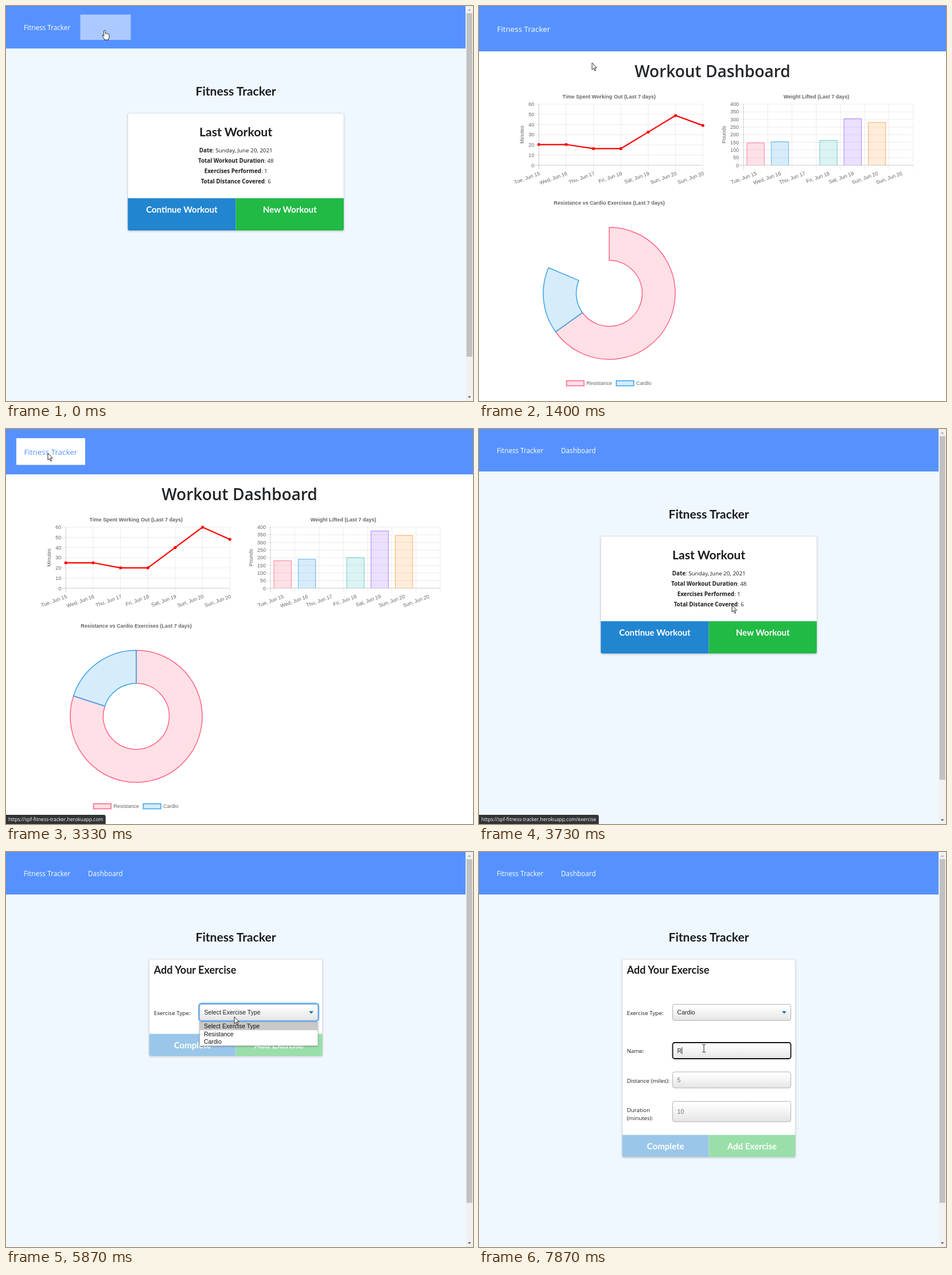
An HTML page for the animation above (8 s loop, 814x688 px).

```html
<!DOCTYPE html>
<html lang="en">
<head>
<meta charset="utf-8">
<title>Fitness Tracker</title>
<style>
html, body { margin: 0; width: 100%; height: 100%; overflow: hidden; }
svg { display: block; width: 100vw; height: 100vh; }
text { white-space: pre; }
.ui { font-family: "Open Sans", "Noto Sans", sans-serif; }
.lato { font-family: Lato, sans-serif; font-weight: 700; }
.arial { font-family: "Liberation Sans", Arial, sans-serif; }
</style>
</head>
<body>
<svg viewBox="0 0 814 688">
  <defs>
    <filter id="soft" x="-10%" y="-10%" width="120%" height="130%">
      <feDropShadow dx="0" dy="1" stdDeviation="1.5" flood-color="#000" flood-opacity=".28"/>
    </filter>
    <linearGradient id="field" x2="0" y2="1">
      <stop offset=".1" stop-color="#fff"/><stop offset="1" stop-color="#e5e5e5"/>
    </linearGradient>
  </defs>
  <g id="stage"></g>
</svg>
<script>
const LOOP = 8000, STEP = 1000 / 15;
const URL_BASE = 'https://spf-fitness-tracker.herokuapp.com';
const stage = document.getElementById('stage');

// Page and interaction times, ms
const AT = { board: 795, charts: 1057, hover: 2930, home: 3395, over: 4065, form: 4690,
  open: 5330, pick: 6530, name: 7130, blink: 7665, typed: 7865 };

const BLUE = [86, 146, 255], WHITE = [255, 255, 255], VISITED = [85, 26, 139];
const GREY = [224, 225, 226], PRIMARY = [33, 133, 208], GREEN = [33, 186, 69], GREEN_HOVER = [22, 171, 57];

// Pointer: time, x, y
const PATH = [
  [0, 172, 42], [1060, 172, 42], [1400, 197, 99], [1870, 378, 300], [2320, 378, 300],
  [2950, 120, 57], [3130, 73, 42], [3395, 73, 42], [3600, 410, 340], [3733, 441, 307],
  [4000, 455, 343], [4065, 455, 344], [4200, 463, 360], [4465, 463, 360], [4733, 465, 362],
  [5270, 400, 282], [5800, 400, 282], [5867, 398, 287], [6270, 372, 330], [6525, 372, 330],
  [7070, 392, 342], [LOOP, 392, 342]
];
const SHAPES = [[0, 'hand'], [860, 'arrow'], [2995, 'hand'], [3195, 'arrow'], [AT.over, 'hand'],
  [4860, 'arrow'], [6990, 'beam']];
const POINTERS = {
  arrow: 'M0 0V12L2.8 9.4L4.8 14L6.6 13.2L4.6 8.8H8.4Z',
  hand: 'M-1.4 1.2Q0-.8 1.4 1.2V6Q2.8 5 4 6.4Q5.4 5.6 6.4 7Q8 6.6 8 8.6V12Q7.6 14 6.6 15V17H-.6V15.4L-4 10.6Q-4.4 8.6-2.8 9L-1.4 10.4Z',
  beam: 'M-3-7Q0-7 0-5.5Q0-7 3-7M0-5.5V5.5M-3 7Q0 7 0 5.5Q0 7 3 7'
};

const DAYS = ['Tue, Jun 15', 'Wed, Jun 16', 'Thu, Jun 17', 'Fri, Jun 18', 'Sat, Jun 19', 'Sun, Jun 20', 'Sun, Jun 20'];
const MINUTES = [25, 25, 20, 20, 40, 60, 48];
const POUNDS = [180, 190, 0, 200, 375, 345, 0];
const TINTS = ['255,99,132', '54,162,235', '255,206,86', '75,192,192', '153,102,255', '255,159,64', '255,99,132'];

const clamp = p => Math.max(0, Math.min(1, p));
const mix = (a, b, p) => `rgb(${a.map((v, i) => Math.round(v + (b[i] - v) * p))})`;

// CSS "ease" curve
function ease(p) {
  let lo = 0, hi = 1, u = 0;
  for (let i = 0; i < 20; i++) {
    u = (lo + hi) / 2;
    if (.75 * u * (1 - u) + u ** 3 < p) lo = u; else hi = u;
  }
  return .3 * u * (1 - u) ** 2 + 3 * u * u * (1 - u) + u ** 3;
}
const fade = (t, start, length) => {
  const p = clamp((t - start) / length);
  return p === 0 || p === 1 ? p : ease(p);
};

const rect = (x, y, w, h, fill, more = '') =>
  `<rect x="${x}" y="${y}" width="${w}" height="${h}" fill="${fill}" ${more}/>`;
const line = (x1, y1, x2, y2, stroke = 'rgba(0,0,0,.1)') =>
  `<path d="M${x1} ${y1}L${x2} ${y2}" stroke="${stroke}" stroke-width=".8"/>`;
const text = (x, y, str, size, cls = 'ui', fill = '#212529', more = '') =>
  `<text x="${x}" y="${y}" class="${cls}" font-size="${size}" fill="${fill}" ${more}>${str}</text>`;
const MID = 'text-anchor="middle"', END = 'text-anchor="end"', BOLD = 'font-weight="700"';

function pointerAt(t) {
  const i = PATH.findIndex((k, n) => n && t < k[0]);
  const [t0, x0, y0] = PATH[i - 1], [t1, x1, y1] = PATH[i];
  const p = (t - t0) / (t1 - t0), s = p * p * (3 - 2 * p);
  return { x: x0 + (x1 - x0) * s, y: y0 + (y1 - y0) * s,
    shape: SHAPES.filter(k => k[0] <= t).pop()[1] };
}

function pointer({ x, y, shape }) {
  const fill = shape === 'beam' ? 'none' : '#fff';
  return `<path transform="translate(${x.toFixed(1)} ${y.toFixed(1)})" d="${POINTERS[shape]}" fill="${fill}" stroke="#111" stroke-width=".9" stroke-linejoin="round"/>`;
}

function statusBar(path) {
  return `<g id="status"><path fill="#323337"/>${text(4, 683.4, URL_BASE + path, 8.5, 'ui', '#fff')}</g>`;
}

function sizeStatus() {
  const bar = document.getElementById('status');
  if (!bar) return;
  const w = bar.querySelector('text').getComputedTextLength() + 8.5;
  bar.querySelector('path').setAttribute('d', `M0 672H${w - 3}q3 0 3 3V688H0Z`);
}

// Frame shared by the home and form pages
function shell(link, hover) {
  const box = hover ? rect(129.5, 15, 88, 44, '#fff', `fill-opacity="${hover}"`) : '';
  return rect(0, 0, 814, 688, '#f0f8ff') + rect(0, 0, 801, 74, mix(BLUE, BLUE, 0)) + box +
    text(31, 42, 'Fitness Tracker', 11.75, 'ui', link) +
    text(143, 42, 'Dashboard', 11.75, 'ui', hover ? mix(WHITE, BLUE, hover) : link) +
    text(400.5, 155.6, 'Fitness Tracker', 21.06, 'lato', '#1b1c1d', MID) +
    rect(801.3, 0, 12.7, 688, '#f1f1f1') + rect(802.7, 12.5, 10, 598.5, '#c1c1c1') +
    '<path d="M805 8.2L807.7 5.2L810.4 8.2Z" fill="#a3a3a3"/><path d="M805 679.8L807.7 682.8L810.4 679.8Z" fill="#505050"/>';
}

function card(x, y, w, h) {
  return rect(x, y, w, h, '#fff', 'rx="3" filter="url(#soft)" stroke="#d4d4d5" stroke-width=".6"');
}

// Pair of joined buttons with rounded lower corners
function buttons(x, y, w, h, base, labels, fills, ink, opacity = 1) {
  const m = x + w / 2, b = y + h;
  return `<g opacity="${opacity}">` +
    `<path d="M${x} ${y}H${m}V${b}H${x + 3}q-3 0-3-3Z" fill="${fills[0]}"/>` +
    `<path d="M${m} ${y}H${x + w}V${b - 3}q0 3-3 3H${m}Z" fill="${fills[1]}"/>` +
    labels.map((s, i) => text(x + w * (1 + 2 * i) / 4, base, s, 15.04, 'lato', ink, MID)).join('') + '</g>';
}

const inkAt = p => `rgba(${Math.round(255 * p)},${Math.round(255 * p)},${Math.round(255 * p)},${.6 + .4 * p})`;

function homePage(t) {
  const later = t >= AT.home;
  const p = later ? fade(t, AT.home + 30, 100) : 1;
  const link = later ? mix(VISITED, WHITE, fade(t, AT.home + 30, 280)) : '#fff';
  const green = t >= AT.over ? mix(GREEN, GREEN_HOVER, fade(t, AT.over - 30, 100)) : mix(GREY, GREEN, p);
  const facts = [['Date', 'Sunday, June 20, 2021'], ['Total Workout Duration', 48],
    ['Exercises Performed', 1], ['Total Distance Covered', 6]];
  return shell(link, later ? 0 : fade(t, -90, 300)) + card(212.3, 187, 376.5, 204) +
    text(400.5, 227.3, 'Last Workout', 21.06, 'lato', '#1b1c1d', MID) +
    facts.map(([k, v], i) => text(400.7, 254.8 + 18.05 * i, `<tspan ${BOLD}>${k}</tspan>: ${v}`, 9.79, 'ui', '#1b1c1d', MID)).join('') +
    buttons(212.3, 334.7, 376.5, 56.3, 360.3, ['Continue Workout', 'New Workout'],
      [mix(GREY, PRIMARY, p), green], inkAt(p));
}

function dayLabel(x, day) {
  return text(0, 3.2, day, 9.02, 'arial', '#666', `${END} transform="translate(${x + 1.5} 291) rotate(-20)"`);
}

// Grid, ticks and scale of one chart
function axes(x0, x1, cols, max, step, unit, unitX, title, shift) {
  const top = 171, base = 277.3, w = (x1 - x0) / cols;
  let out = text(shift, 161.3, title, 9.02, 'arial', '#666', `${MID} ${BOLD}`) +
    text(0, 3, unit, 9.02, 'arial', '#666', `${MID} transform="translate(${unitX} 224) rotate(-90)"`);
  for (let v = 0; v <= max; v += step) {
    const y = base - (base - top) * v / max;
    out += line(x0 - 7.5, y, x1, y, v ? undefined : 'rgba(0,0,0,.25)') +
      text(x0 - 8, y + 3.2, v, 9.02, 'arial', '#666', END);
  }
  for (let i = 0; i <= cols; i++) {
    const x = x0 + w * i;
    out += line(x, top, x, base + 7.5, i ? undefined : 'rgba(0,0,0,.25)');
  }
  return out;
}

function lineChart(e) {
  const x = i => 104.3 + 47.65 * i;
  const pts = MINUTES.map((v, i) => [x(i), 277.3 - 106.3 * v / 60 * e]);
  return axes(104.3, 390.2, 6, 60, 10, 'Minutes', 74.5, 'Time Spent Working Out (Last 7 days)', 226.8) +
    DAYS.map((d, i) => dayLabel(x(i), d)).join('') +
    `<polyline points="${pts.join(' ')}" fill="none" stroke="red" stroke-width="2.25"/>` +
    pts.map(([a, b]) => `<circle cx="${a}" cy="${b}" r="2.6" fill="red"/>`).join('');
}

function barChart(e) {
  const w = 42.3, x = i => 461 + w * i;
  return axes(461, 757, 7, 400, 50, 'Pounds', 427, 'Weight Lifted (Last 7 days)', 588) +
    DAYS.map((d, i) => dayLabel(x(i) + w / 2, d)).join('') +
    POUNDS.map((v, i) => {
      const h = 106.3 * v / 400 * e, left = x(i) + 6;
      return v ? `<path d="M${left} 277.3v${-h}h30.4v${h}" fill="rgba(${TINTS[i]},.2)" stroke="rgb(${TINTS[i]})" stroke-width=".8"/>` : '';
    }).join('');
}

function slice(from, to, tint) {
  const at = (deg, r) => {
    const a = deg * Math.PI / 180;
    return `${(227 + r * Math.sin(a)).toFixed(2)} ${(500.5 - r * Math.cos(a)).toFixed(2)}`;
  };
  const big = to - from > 180 ? 1 : 0;
  return `<path d="M${at(from, 115)}A115 115 0 ${big} 1 ${at(to, 115)}L${at(to, 57.5)}A57.5 57.5 0 ${big} 0 ${at(from, 57.5)}Z" fill="rgba(${tint},.2)" stroke="rgb(${tint})" stroke-width="1.5" stroke-linejoin="bevel"/>`;
}

function ringChart(e) {
  const key = (x, s, tint) =>
    rect(x, 652.7, 30.5, 8.8, `rgba(${tint},.2)`, `stroke="rgb(${tint})" stroke-width="1.5"`) +
    text(x + 34.7, 659.9, s, 9.02, 'arial', '#666');
  return text(227, 345.8, 'Resistance vs Cardio Exercises (Last 7 days)', 9.02, 'arial', '#666', `${MID} ${BOLD}`) +
    slice(0, 288 * e, TINTS[0]) + slice(288 * e, 360 * e, TINTS[1]) +
    key(152.5, 'Resistance', TINTS[0]) + key(239.3, 'Cardio', TINTS[1]);
}

function boardPage(t) {
  const hover = fade(t, AT.hover, 300);
  const link = hover ? mix(WHITE, BLUE, hover) : mix(VISITED, WHITE, fade(t, AT.board - 30, 160));
  let out = rect(0, 0, 814, 688, '#fff') + rect(0, 0, 814, 79, mix(BLUE, BLUE, 0)) +
    (hover ? rect(18, 16, 120, 46.5, '#fff', `fill-opacity="${hover}"`) : '') +
    text(31.5, 45.2, 'Fitness Tracker', 13.43, 'ui', link) +
    text(407, 124, 'Workout Dashboard', 28, 'ui', '#212529', `${MID} font-weight="600"`);
  if (t >= AT.charts) {
    const e = 1 - (1 - clamp((t - AT.charts) / 1000)) ** 4;
    out += lineChart(e) + barChart(e) + ringChart(e);
  }
  return out;
}

function field(y, h, value, ink = '#222', edge = '#aaa', width = .9) {
  return rect(337.5, y, 206, h, 'url(#field)', `rx="3.5" stroke="${edge}" stroke-width="${width}"`) +
    text(345.6, y + h / 2 + 4, value, 10.53, 'arial', ink);
}

const label = (y, s) => text(257.7, y, s, 9.79, 'ui', '#1b1c1d');

function menu(y) {
  const row = y < 310 ? 0 : y < 324 ? 1 : 2;
  return rect(337.3, 296.5, 206.5, 41, '#fff', 'filter="url(#soft)" stroke="#999" stroke-width=".6"') +
    rect(337.5, 296.8 + 13.5 * row, 206, 13.5, '#c8c8c8') +
    ['Select Exercise Type', 'Resistance', 'Cardio'].map((s, i) =>
      text(345, 307 + 13.5 * i, s, 10.45, 'arial', '#111')).join('');
}

function extraFields(t) {
  const active = t >= AT.name, typed = t >= AT.typed;
  const caret = active && (t < AT.blink || typed) ? rect(typed ? 353.4 : 346.2, 340, .9, 12, '#111') : '';
  return label(350.2, 'Name:') + label(401.5, 'Distance (miles):') + label(453, 'Duration') + label(467.2, '(minutes):') +
    field(332, 28, typed ? 'R' : 'Running', typed ? '#222' : '#757575', active ? '#101010' : '#aaa', active ? 1.8 : .9) +
    field(383, 28, '5', '#757575') + field(434.3, 35.5, '10', '#757575') + caret;
}

function formPage(t, hand) {
  const p = fade(t, AT.form, 100), picked = t >= AT.pick;
  const foot = picked ? 492.8 : 316.7;
  const ring = t >= AT.open && t < AT.name
    ? rect(336.2, 263.9, 208.6, 30.8, 'none', 'rx="4.5" stroke="#6cb0f2" stroke-width="2.6"') : '';
  return shell(mix(VISITED, WHITE, fade(t, AT.form, 300)), 0) +
    card(249.8, 187, 301.5, foot + 38.3 - 187) +
    text(257.7, 212.2, 'Add Your Exercise', 18.05, 'lato', '#1b1c1d') +
    label(284, 'Exercise Type:') +
    field(265.4, 28, picked ? 'Cardio' : 'Select Exercise Type') +
    '<path d="M528 277.3H536L532 281.8Z" fill="#007cb2"/>' + ring +
    buttons(249.8, foot, 301.5, 38.3, foot + 25.6, ['Complete', 'Add Exercise'],
      [mix(GREY, PRIMARY, p), mix(GREY, GREEN, p)], inkAt(p), .45) +
    (picked ? extraFields(t) : t >= AT.open ? menu(hand.y) : '');
}

function statusPath(t) {
  if (t >= 460 && t < 1190) return '/stats';
  if (t >= 3060 && t < AT.home) return '';
  if (t >= 3590 && t < 3930 || t >= AT.over && t < 5130) return '/exercise';
  return null;
}

function draw(t) {
  const hand = pointerAt(t), path = statusPath(t);
  const page = t >= AT.form ? formPage(t, hand)
    : t >= AT.board && t < AT.home ? boardPage(t) : homePage(t);
  stage.innerHTML = page + (path === null ? '' : statusBar(path)) + pointer(hand);
  sizeStatus();
}

let shown = -1;
function tick() {
  const step = Math.floor((performance.now() % LOOP + 4) / STEP) % (LOOP / STEP);
  if (step !== shown) draw((shown = step) * STEP);
  requestAnimationFrame(tick);
}
tick();
</script>
</body>
</html>
```
